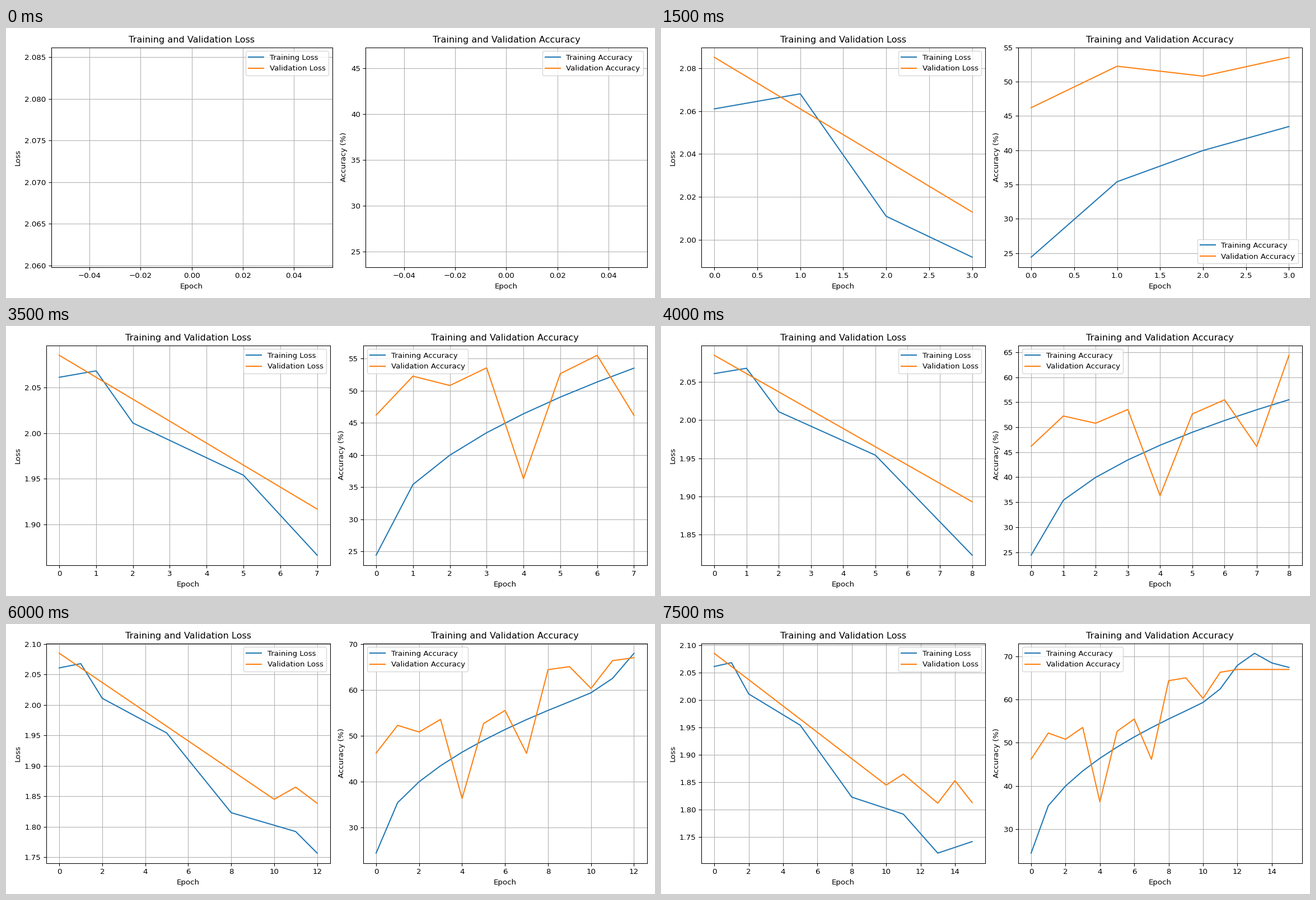
A matplotlib script that plays this animation: 1159 px wide and 483 px high, repeating every 8000 ms.

```python
import matplotlib.pyplot as plt
import numpy as np
from matplotlib.animation import FuncAnimation

WIDTH, HEIGHT = 1159, 483
DPI = WIDTH / 12
EPOCHS = 16
INTERVAL = 500

epochs = np.arange(EPOCHS)


def through(*points):
    """Straight runs between a few (epoch, value) points."""
    return np.interp(epochs, *zip(*points))


# Loss falls in nearly straight runs, then levels off.
train_loss = through((0, 2.061), (1, 2.068), (2, 2.011), (5, 1.954),
                     (8, 1.823), (11, 1.792), (13, 1.721), (15, 1.742))
val_loss = through((0, 2.085), (10, 1.845), (11, 1.865),
                   (13, 1.812), (14, 1.853), (15, 1.813))

# Training accuracy grows like a square root with a late bump.
train_acc = 24.4 + 11 * np.sqrt(epochs) + 7 * np.exp(-((epochs - 12.7) / 1.4) ** 2)

# Validation accuracy climbs slowly, jumps once and has sudden dips.
val_acc = np.minimum(51.6 + 0.65 * epochs + 7.6 * (epochs >= 8), 67)
for epoch, drop in {0: 5.4, 2: 2.1, 4: 17.9, 5: 2.2, 7: 10, 10: 5.4}.items():
    val_acc[epoch] -= drop

plt.rcParams["font.family"] = "DejaVu Sans"
fig, (loss_ax, acc_ax) = plt.subplots(
    1, 2, figsize=(WIDTH / DPI, HEIGHT / DPI), dpi=DPI)


def draw_panel(ax, name, ylabel, train, val, count):
    ax.clear()
    ax.plot(epochs[:count], train[:count], label=f"Training {name}")
    ax.plot(epochs[:count], val[:count], label=f"Validation {name}")
    ax.set_title(f"Training and Validation {name}")
    ax.set_xlabel("Epoch")
    ax.set_ylabel(ylabel)
    ax.legend()
    ax.grid(True)


def update(epoch):
    count = epoch + 1
    draw_panel(loss_ax, "Loss", "Loss", train_loss, val_loss, count)
    draw_panel(acc_ax, "Accuracy", "Accuracy (%)", train_acc, val_acc, count)
    fig.tight_layout()


anim = FuncAnimation(fig, update, frames=EPOCHS, interval=INTERVAL,
                     repeat=True, repeat_delay=0)
plt.show()
```
